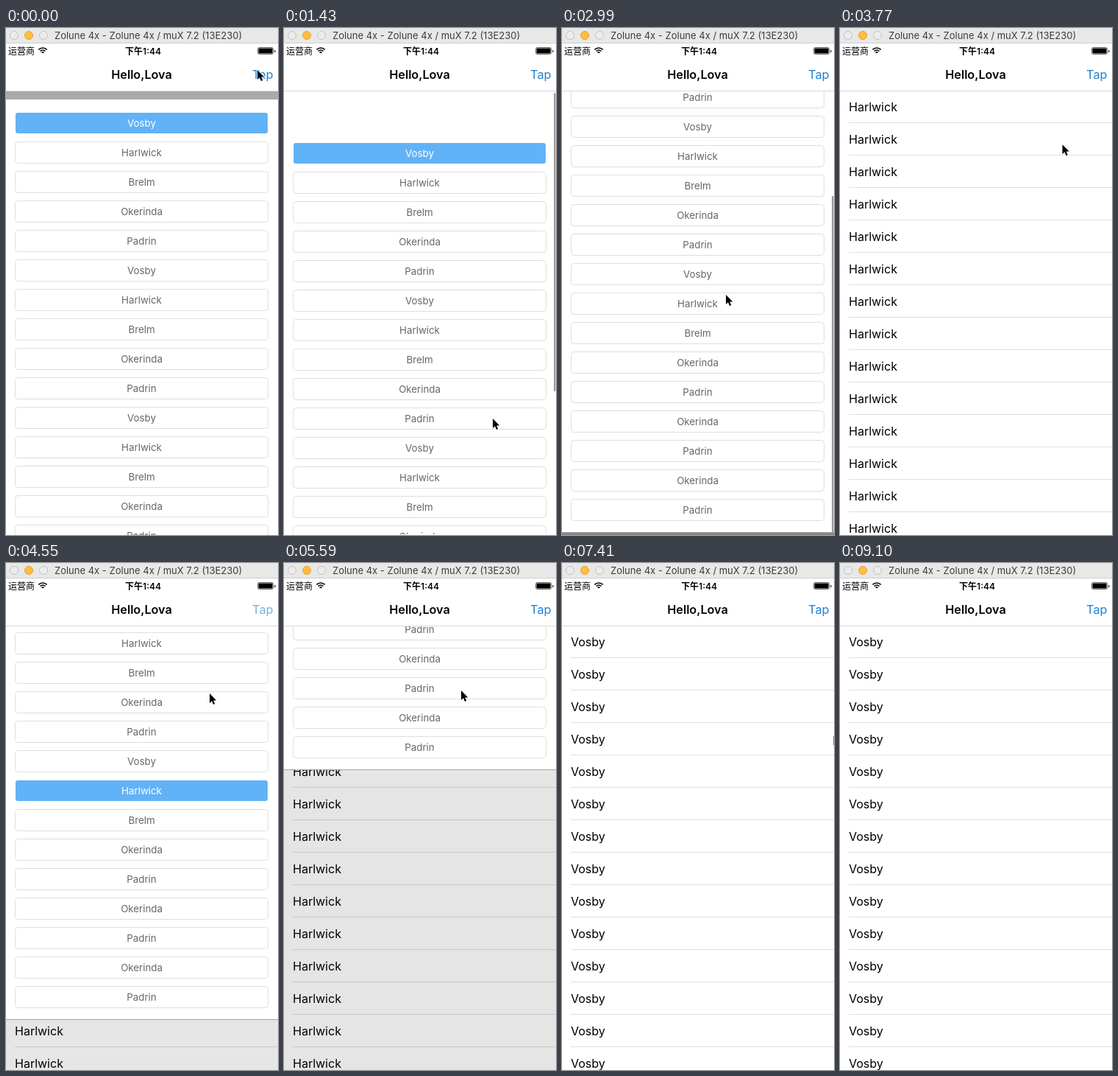
An HTML page with a canvas that plays this animation: 370 px wide and 688 px high, repeating every 9230 ms.

```html
<!DOCTYPE html>
<html lang="zh">
<head>
<meta charset="utf-8">
<style>
html, body { margin: 0; width: 100%; height: 100%; overflow: hidden; background: #fff; }
canvas { display: block; }
</style>
</head>
<body>
<canvas id="stage" width="370" height="688"></canvas>
<script>
const ctx = document.getElementById('stage').getContext('2d');
const LOOP = 9230, STEP = 130, W = 370, H = 688;
const NAV = 86, PANEL_H = H - NAV, ROWS = 19, MAX_SCROLL = 181;
const SANS = 'Inter, "Noto Sans CJK SC", "Noto Sans CJK", sans-serif';
const ARROW = new Path2D('M0 0V13L3 10.2 5 15 7.2 14 5.2 9.4H9.2Z');

const names = ['Vosby', 'Harlwick', 'Brelm', 'Okerinda', 'Padrin'];
const nameOf = row => names[row < 15 ? row % 5 : 4 - row % 2];

const visits = [
  { open: -399, close: 2935, pick: 11 },
  { open: 4366, close: 5305, pick: 6 },
  { open: 6041, close: 6800, pick: 5 }
];

// Pointer stops: [arrival time, x, y]
const TAP = [342, 57], HOLD = 100;
const stops = [
  [0, ...TAP], [160, ...TAP], [1430, 284, 530], [2890, 223, 362],
  [4260, ...TAP], [4550, 277, 177], [5490, 241, 173], [5950, ...TAP],
  [6500, 261, 198], [6760, 255, 136], [7500, 376, 240]
];

const clamp = v => Math.min(1, Math.max(0, v));
const smooth = v => { v = clamp(v); return v * v * (3 - 2 * v); };
const ease = (t, start, length) => smooth((t - start) / length);

// Underdamped response from 1 to 0
function spring(ms) {
  const z = 0.75, w = 0.0148 * ms, r = Math.sqrt(1 - z * z);
  return Math.exp(-z * w) * (Math.cos(r * w) + z / r * Math.sin(r * w));
}

function panelState(t) {
  const state = { lit: 0, listed: 0, y: 0, dim: 0 };
  for (const { open, close, pick } of visits) {
    if (t < open) break;
    state.lit = state.listed;
    const out = ease(t, close, 400);
    state.y = Math.round(-PANEL_H * (t < close ? spring(t - open) : out ** 1.75));
    state.dim = 0.5 * (t < close ? ease(t, open, 650) : 1 - out);
    if (t >= close) state.listed = pick;
  }
  return state;
}

// Pull down past the top, let go, then fling to the end
function scrollAt(t) {
  const pull = ease(t, 950, 480) - ease(t, 1560, 390);
  return Math.round(MAX_SCROLL * ease(t, 2080, 520) - 52 * pull);
}

function pointerAt(t) {
  const i = stops.findIndex(s => s[0] > t);
  if (i < 0) return stops[stops.length - 1].slice(1);
  const [t0, x0, y0] = stops[i - 1], [t1, x1, y1] = stops[i];
  const u = ease(t, t0 + HOLD, t1 - t0 - HOLD);
  return [x0 + (x1 - x0) * u, y0 + (y1 - y0) * u];
}

function rect(x, y, w, h, color) {
  ctx.fillStyle = color;
  ctx.fillRect(x, y, w, h);
}

function rounded(x, y, w, h, r, fill, stroke) {
  ctx.beginPath();
  ctx.roundRect(x, y, w, h, r);
  if (fill) { ctx.fillStyle = fill; ctx.fill(); }
  if (stroke) { ctx.strokeStyle = stroke; ctx.stroke(); }
}

function text(str, x, y, size, color, align = 'left', weight = 400) {
  ctx.font = `${weight} ${size}px ${SANS}`;
  ctx.textAlign = align;
  ctx.fillStyle = color;
  ctx.fillText(str, x, y);
}

function drawList(name) {
  for (let y = 107; y < 720; y += 44) {
    text(name, 12, y + 6, 16, '#000');
    rect(12, y + 21, W, 1, '#dfdfe1');
  }
}

function drawScrollbar(t, top, scroll) {
  ctx.globalAlpha = ease(t, 930, 150) - ease(t, 3000, 250);
  const length = 457 - Math.max(0, -scroll);
  rounded(367, top + 2 + clamp(scroll / MAX_SCROLL) * 143, 2.5, length, 1.25, '#9c9c9c');
  ctx.globalAlpha = 1;
}

function drawPanel(t, y, lit) {
  const top = NAV + y, scroll = scrollAt(t);
  ctx.save();
  ctx.beginPath();
  ctx.rect(0, top, W, PANEL_H);
  ctx.clip();
  rect(0, top, W, PANEL_H, '#fff');
  for (let row = 0; row < ROWS; row++) {
    const mid = top + 32 + row * 40 - scroll, on = row === lit;
    if (on) rounded(13, mid - 14, 343, 28, 3, '#62b2f7');
    else rounded(12.5, mid - 14.5, 344, 29, 4, null, '#dedede');
    text(nameOf(row), 184.5, mid + 5, 13.3, on ? '#fff' : '#666', 'center');
  }
  drawScrollbar(t, top, scroll);
  ctx.restore();
  rect(0, top + PANEL_H - 1, W, 1, y < 0 ? '#a6a6a6' : '#fff');
}

function drawWindowBar() {
  rect(0, 0, W, 20, '#e8e8e8');
  rect(0, 20, W, 1, '#cfcfcf');
  for (let i = 0; i < 3; i++) {
    const [fill, edge] = i === 1 ? ['#fdbd3f', '#e2a436'] : ['#ececec', '#c3c3c3'];
    rounded(5.5 + 20 * i, 4.5, 11, 11, 5.5, fill, edge);
  }
  text('Zolune 4x - Zolune 4x / muX 7.2 (13E230)', 66, 15, 13, '#3c3c3c');
}

function drawStatus() {
  text('运营商', 3, 35.5, 12, '#000');
  text('下午1:44', 186.5, 35.5, 12, '#000', 'center', 600);
  ctx.strokeStyle = '#000';
  ctx.lineWidth = 1.6;
  for (let r = 2; r < 9; r += 3) {
    ctx.beginPath();
    ctx.arc(50, 35, r, -Math.PI * 0.75, -Math.PI * 0.25);
    ctx.stroke();
  }
  ctx.lineWidth = 1;
  rounded(342.5, 26.5, 21, 9, 2, '#fff', '#666');
  rect(343.5, 27.5, 19, 7, '#000');
  rect(365, 30, 1.5, 3, '#444');
}

function drawNav(t) {
  text('Hello,Lova', 184.5, 69, 16.2, '#000', 'center', 600);
  const fades = visits.filter(v => t > v.open - 100).map(v => clamp((t - v.open) / 350));
  ctx.globalAlpha = 0.2 + 0.8 * Math.min(...fades);
  text('Tap', 363.5, 69, 16.3, '#1f7fcf', 'right');
  ctx.globalAlpha = 1;
  rect(0, 85, W, 1, '#dadada');
}

function drawPointer(x, y) {
  ctx.save();
  ctx.translate(x, y);
  ctx.lineJoin = 'round';
  ctx.lineWidth = 2;
  ctx.strokeStyle = '#fff';
  ctx.stroke(ARROW);
  ctx.fillStyle = '#000';
  ctx.fill(ARROW);
  ctx.restore();
}

function draw(t) {
  const { lit, listed, y, dim } = panelState(t);
  rect(0, 0, W, H, '#fff');
  drawList(nameOf(listed));
  rect(0, NAV, W, PANEL_H, `rgba(0,0,0,${dim})`);
  drawPanel(t, y, lit);
  rect(0, 0, W, NAV, '#fff');
  drawWindowBar();
  drawStatus();
  drawNav(t);
  drawPointer(...pointerAt(t));
}

function tick() {
  draw(Math.floor(performance.now() % LOOP / STEP) * STEP);
  requestAnimationFrame(tick);
}
tick();
</script>
</body>
</html>
```
